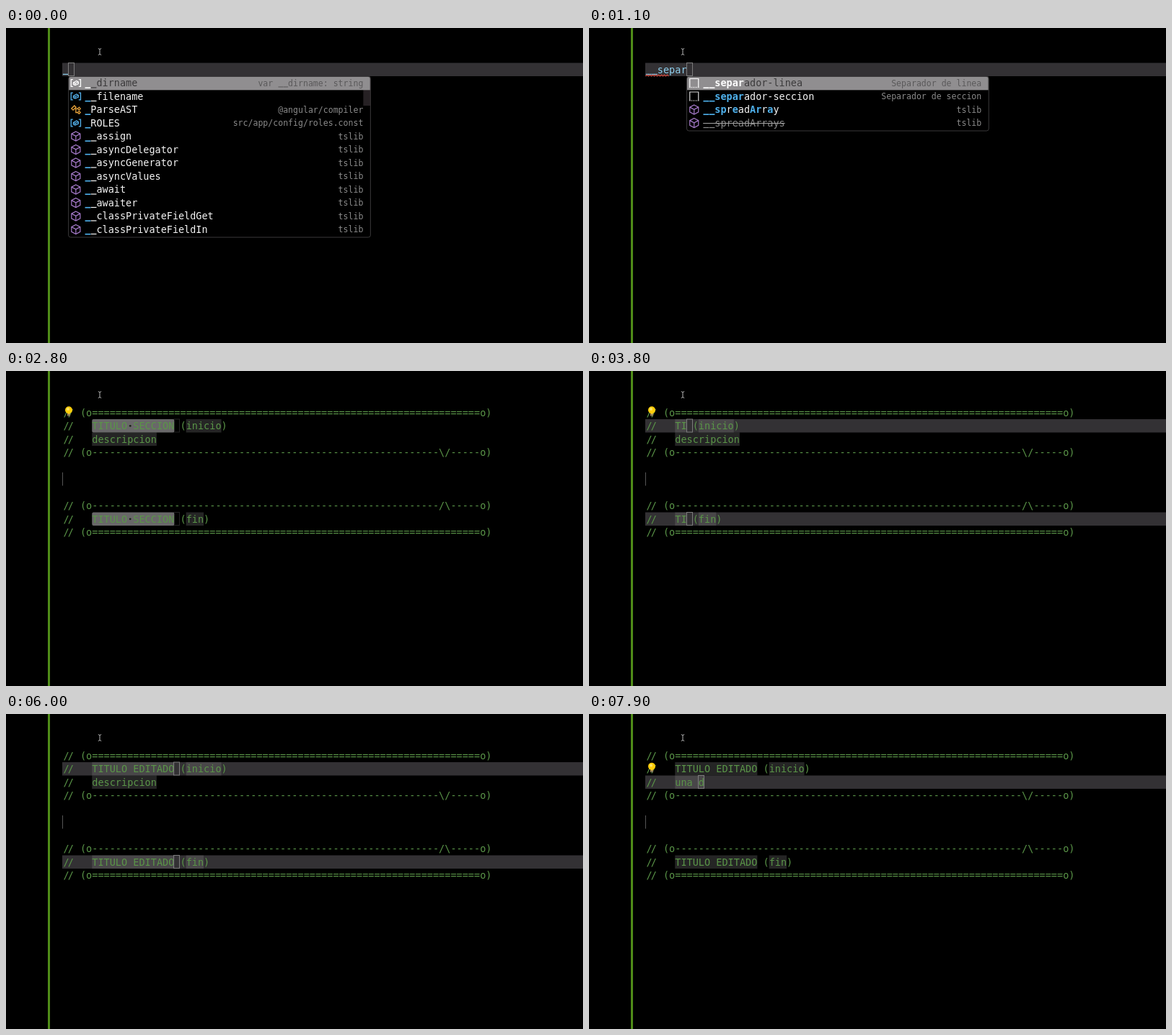
An HTML page with a canvas that plays this animation: 800x438 px, repeating every 8000 ms.

```html
<!DOCTYPE html>
<html lang="es">
<head>
<meta charset="utf-8">
<style>
  html, body { margin: 0; width: 100%; height: 100%; overflow: hidden; background: #000; }
  canvas { display: block; width: 800px; height: 438px; }
</style>
</head>
<body>
<canvas id="stage" width="800" height="438"></canvas>
<script>
const ctx = document.getElementById('stage').getContext('2d');
const LOOP = 8000;
const X0 = 78.5, Y0 = 48.5, ADV = 8.15, ROW = 18.5;
const FONT = '"DejaVu Sans Mono", monospace', EM_ADV = 0.602;
const GREEN = '#5a9548', WHITE = '#f4f4f4', BLUE = '#4fb2ee', GREY = '#8a8a8a';
const LINE_BG = '#333134', HOLDER_BG = 'rgba(124,124,124,.3)';

const colX = c => X0 + c * ADV;
const rowY = r => Y0 + r * ROW;
const clamp = v => Math.max(0, Math.min(1, v));
const ramp = (t, a, b) => clamp((t - a) / (b - a));
const countUntil = (times, t) => times.filter(x => x <= t).length;

// Each item: kind|label with [matched] parts|detail; "~" marks a deprecated entry.
const LISTS = {
  1: ['v|[_]_dirname|var __dirname: string', 'v|[_]_filename|', 'c|[_]ParseAST|@angular/compiler',
    'v|[_]ROLES|src/app/config/roles.const', 'm|[_]_assign', 'm|[_]_asyncDelegator',
    'm|[_]_asyncGenerator', 'm|[_]_asyncValues', 'm|[_]_await', 'm|[_]_awaiter',
    'm|[_]_classPrivateFieldGet', 'm|[_]_classPrivateFieldIn'],
  2: ['v|[__]dirname|var __dirname: string', 'v|[__]filename|', 'm|[__]assign',
    'm|[__]asyncDelegator', 'm|[__]asyncGenerator', 'm|[__]asyncValues', 'm|[__]await',
    'm|[__]awaiter', 'm|[__]classPrivateFieldGet', 'm|[__]classPrivateFieldIn',
    'm|[__]classPrivateFieldSet', 'm|[__]createBinding'],
  3: ['m|[__s]etFunctionName', 's|[__s]eparador-linea|Separador de linea',
    's|[__s]eparador-seccion|Separador de seccion', 'm|[__s]preadArray', 'm|~__spread',
    'm|~__spreadArrays', 'm|[__]e[s]Decorate', 'm|[__]export[S]tar', 'm|[__]extend[s]',
    'm|[__]re[s]t', 'm|[__]value[s]', 'm|[__]a[s]yncDelegator'],
  4: ['m|[__se]tFunctionName', 's|[__se]parador-linea|Separador de linea',
    's|[__se]parador-seccion|Separador de seccion', 'm|[__es]Decorate', 'm|[__s]pr[e]adArray',
    'm|~__spread', 'm|~__spreadArrays', 'm|[__e]xport[S]tar', 'm|[__e]xtend[s]',
    'm|[__]r[es]t', 'm|[__]valu[es]', 'm|[__]a[s]yncD[e]legator'],
};
const THUMB_END = { 1: 108, 2: 108, 3: 209, 4: 209 };
const WORD = '__separa';

function listFor(n) {
  if (LISTS[n]) return LISTS[n];
  const snippet = name => `s|[${WORD.slice(0, n)}]${('__separador-' + name).slice(n)}|Separador de ${name}`;
  return [snippet('linea'), snippet('seccion'), 'm|[__sp]r[e]ad[Ar]r[a]y', 'm|~__spreadArrays'];
}

// Underscores are drawn as bars so that neighbours join.
function mono(text, x, y, color, adv = ADV, bold = false) {
  const size = adv / EM_ADV;
  ctx.font = `${bold ? 'bold ' : ''}${size}px ${FONT}`;
  ctx.fillStyle = color;
  [...text].forEach((ch, i) => {
    const left = x + i * adv;
    if (ch === '_') ctx.fillRect(left + 0.3, y + size * 0.08, adv - 0.3, size * (bold ? 0.12 : 0.09));
    else if (ch !== ' ') ctx.fillText(ch, left, y);
  });
}

function code(text, col, row, color = GREEN) {
  mono(text, colX(col), rowY(row) + 14.2, color);
}

function fill(color, x, y, w, h) {
  ctx.fillStyle = color;
  ctx.fillRect(x, y, w, h);
}

function cells(color, col, row, n) {
  fill(color, colX(col), rowY(row), n * ADV, ROW);
}

function path(color, width, points, close = false) {
  ctx.strokeStyle = color;
  ctx.lineWidth = width;
  ctx.beginPath();
  points.forEach(([x, y]) => ctx.lineTo(x, y));
  if (close) ctx.closePath();
  ctx.stroke();
}

function lineHighlight(row) {
  fill(LINE_BG, 78, rowY(row), 722, ROW);
}

function caret(col, row, alpha = 1) {
  ctx.globalAlpha = alpha;
  ctx.strokeStyle = '#7c7c7c';
  ctx.lineWidth = 1;
  ctx.strokeRect(Math.round(colX(col)) - 0.5, rowY(row), 8, ROW - 0.5);
  ctx.globalAlpha = 1;
}

function bulb(row) {
  const y = rowY(row) + 5.8;
  fill('#c9a24a', 85, y + 3.5, 4, 4.5);
  fill('#77705c', 85.5, y + 6, 3, 2.2);
  ctx.fillStyle = '#ffcd0a';
  ctx.beginPath();
  ctx.arc(87, y, 5, 0, 7);
  ctx.fill();
  ctx.fillStyle = '#ffe56a';
  ctx.beginPath();
  ctx.arc(86, y - 1.2, 2, 0, 7);
  ctx.fill();
}

const icons = {
  m(color) {
    const hex = [[0, -6.5], [6, -3.4], [6, 3.4], [0, 6.5], [-6, 3.4], [-6, -3.4]];
    path(color, 1.2, hex, true);
    path(color, 1.2, [[-6, -3.4], [0, -0.3], [6, -3.4]]);
    path(color, 1.2, [[0, -0.3], [0, 6.5]]);
  },
  v(color) {
    for (const s of [-1, 1]) path(color, 1.3, [[s * 4, -4.8], [s * 6.6, -4.8], [s * 6.6, 4.8], [s * 4, 4.8]]);
    path(color, 1.2, [[-3.5, -0.5], [1, -3], [3.5, -1.4], [3.5, 1], [-1, 3], [-3.5, 1.8]], true);
    path(color, 1.1, [[-3.5, -0.5], [-1, 0.6], [3.5, -1.4]]);
    path(color, 1.1, [[-1, 0.6], [-1, 3]]);
  },
  c(color) {
    path(color, 1.3, [[-6, -1.5], [-2, -5.5], [0.2, -3.3], [-3.8, 0.7]], true);
    path(color, 1.3, [[-1.3, -1.3], [3, -1.3]]);
    path(color, 1.3, [[0, -1.3], [0, 4], [3, 4]]);
    for (const y of [-1.3, 4]) path(color, 1.2, [[2.6, y], [4.6, y - 2], [6.4, y], [4.4, y + 2]], true);
  },
  s(color) {
    path(color, 1.2, [[-6, 6], [-6, -6], [6, -6], [6, 6]]);
    for (let x = -6; x <= 6; x += 2.4) fill(color, x - 0.6, 5.4, 1.2, 1.2);
  },
};
const ICON_COLORS = { m: '#a67bcb', v: '#55b3ee', c: '#e8a33a', s: '#d8d8d8' };

function suggestItem(item, left, right, y, selected) {
  const [kind, rawLabel, detail = 'tslib'] = item.split('|');
  const old = rawLabel[0] === '~';
  const label = old ? rawLabel.slice(1) : rawLabel;
  const adv = 8.11, small = 6.95;
  const base = y + 13.8;
  if (selected) fill('#908e90', left + 0.5, y + 0.3, right - left - 1, ROW);

  ctx.save();
  ctx.translate(left + 10.2, y + 9);
  icons[kind](selected ? '#fff' : ICON_COLORS[kind]);
  ctx.restore();

  let x = left + 22.6;
  const plain = selected ? '#3b3a3b' : old ? GREY : WHITE;
  label.split(/[[\]]/).forEach((part, i) => {
    const match = i % 2 === 1;
    mono(part, x, base, match ? (selected ? '#fff' : BLUE) : plain, adv, match);
    x += part.length * adv;
  });
  if (old) fill('#a5a5a5', left + 22.6, y + 9, x - left - 22.6, 1);
  mono(detail, right - 10 - detail.length * small, base - 0.8, selected ? '#5a595a' : GREY, small);
}

function suggestBox(n, selected) {
  const items = listFor(n);
  const left = colX(n), right = left + 418.7;
  const height = items.length * ROW + 1.5;
  ctx.beginPath();
  ctx.roundRect(left, 67.5, right - left, height, 3);
  ctx.fillStyle = '#000';
  ctx.fill();
  if (THUMB_END[n]) fill('#262124', right - 10, 68, 10, THUMB_END[n] - 68);
  items.forEach((item, i) => suggestItem(item, left, right, 67.5 + i * ROW, i === selected));
  ctx.beginPath();
  ctx.roundRect(left, 67.5, right - left, height, 3);
  ctx.strokeStyle = '#3a393a';
  ctx.lineWidth = 1;
  ctx.stroke();
}

function squiggle(n) {
  const points = [];
  for (let x = X0, i = 0; x <= colX(n); x += 2, i++) points.push([x, i % 2 ? 65 : 67]);
  path('#d0483c', 1.1, points);
}

function sceneComplete(t) {
  const n = 1 + countUntil([100, 500, 700, 900, 1000, 1100, 1200], t);
  lineHighlight(0);
  code(WORD.slice(0, n), 0, 0, '#8fd0ee');
  const marked = t >= 1600 ? 8 : t >= 1000 ? 4 : t >= 600 ? 2 : 0;
  if (marked) squiggle(marked);
  caret(n, 0);
  suggestBox(n, t >= 1600 ? 1 : 0);
}

const TITLE_TIMES = [3700, 3800, 4000, 4100, 4300, 4500, 5100, 5200, 5300, 5400, 5500, 5700, 5800, 5900];
const TEXT_TIMES = [7400, 7500, 7700, 7800, 7900];

function selection(col, row, n) {
  ctx.fillStyle = '#696869';
  ctx.beginPath();
  ctx.roundRect(colX(col), rowY(row), n * ADV, ROW, 2);
  ctx.fill();
}

function comment(row, text = '') {
  mono('/', X0 + 0.9, rowY(row) + 14.2, GREEN);
  mono('/', colX(1) - 0.9, rowY(row) + 14.2, GREEN);
  code(text, 3, row);
}

function titleRow(row, title, suffix, picked, alpha) {
  const end = 5 + title.length;
  if (picked) selection(5, row, title.length);
  else cells(HOLDER_BG, 5, row, title.length);
  cells(HOLDER_BG, end + 2, row, suffix.length);
  comment(row, `  ${title} (${suffix})`);
  if (picked) {
    ctx.fillStyle = '#182015';
    ctx.beginPath();
    ctx.arc(colX(11.5), rowY(row) + 9.3, 1.4, 0, 7);
    ctx.fill();
  }
  if (alpha) caret(end, row, alpha);
}

function caretAlpha(t) {
  if (t < 3700) return 1 - ramp(t, 2650, 2860) + ramp(t, 3150, 3500);
  if (t < 7400) return 1 - ramp(t, 6850, 7100);
  return 1;
}

function sceneSnippet(t) {
  const typed = countUntil(TITLE_TIMES, t);
  const picked = typed === 0;
  const title = picked ? 'TITULO SECCION' : 'TITULO EDITADO'.slice(0, typed);
  const inTitle = t < 6200;
  const alpha = caretAlpha(t);
  if (!picked && inTitle) [1, 8].forEach(lineHighlight);

  const rule = '='.repeat(66), dashes = '-'.repeat(59);
  comment(0, `(o${rule}o)`);
  titleRow(1, title, 'inicio', picked, inTitle && alpha);

  const written = countUntil(TEXT_TIMES, t);
  const text = written ? 'una d'.slice(0, written) : 'descripcion';
  if (written) lineHighlight(2);
  if (!inTitle && !written) selection(5, 2, text.length);
  else cells(HOLDER_BG, 5, 2, text.length);
  comment(2, '  ' + text);
  if (!inTitle) caret(5 + (written ? Math.min(written, 4) : text.length), 2, alpha);

  comment(3, `(o${dashes}\\/-----o)`);
  fill('#555', 78, rowY(5), 1, ROW);
  comment(7, `(o${dashes}/\\-----o)`);
  titleRow(8, title, 'fin', picked, inTitle && alpha);
  comment(9, `(o${rule}o)`);

  if (t >= 2700 && t < 5100) bulb(0);
  if (t >= 6500) bulb(1);
}

function pointer() {
  const c = '#b4b4b4';
  path(c, 1, [[130, 29.5], [130, 36.5]]);
  for (const [y, d] of [[28.5, 1], [37.5, -1]]) path(c, 1, [[127.8, y], [130, y + d], [132.2, y]]);
}

function frame(now) {
  const t = now % LOOP;
  fill('#000', 0, 0, 800, 438);
  fill('#4f8c18', 58, 0, 3, 438);
  if (t < 1900) sceneComplete(t);
  else sceneSnippet(t);
  pointer();
  requestAnimationFrame(frame);
}
requestAnimationFrame(frame);
</script>
</body>
</html>
```
